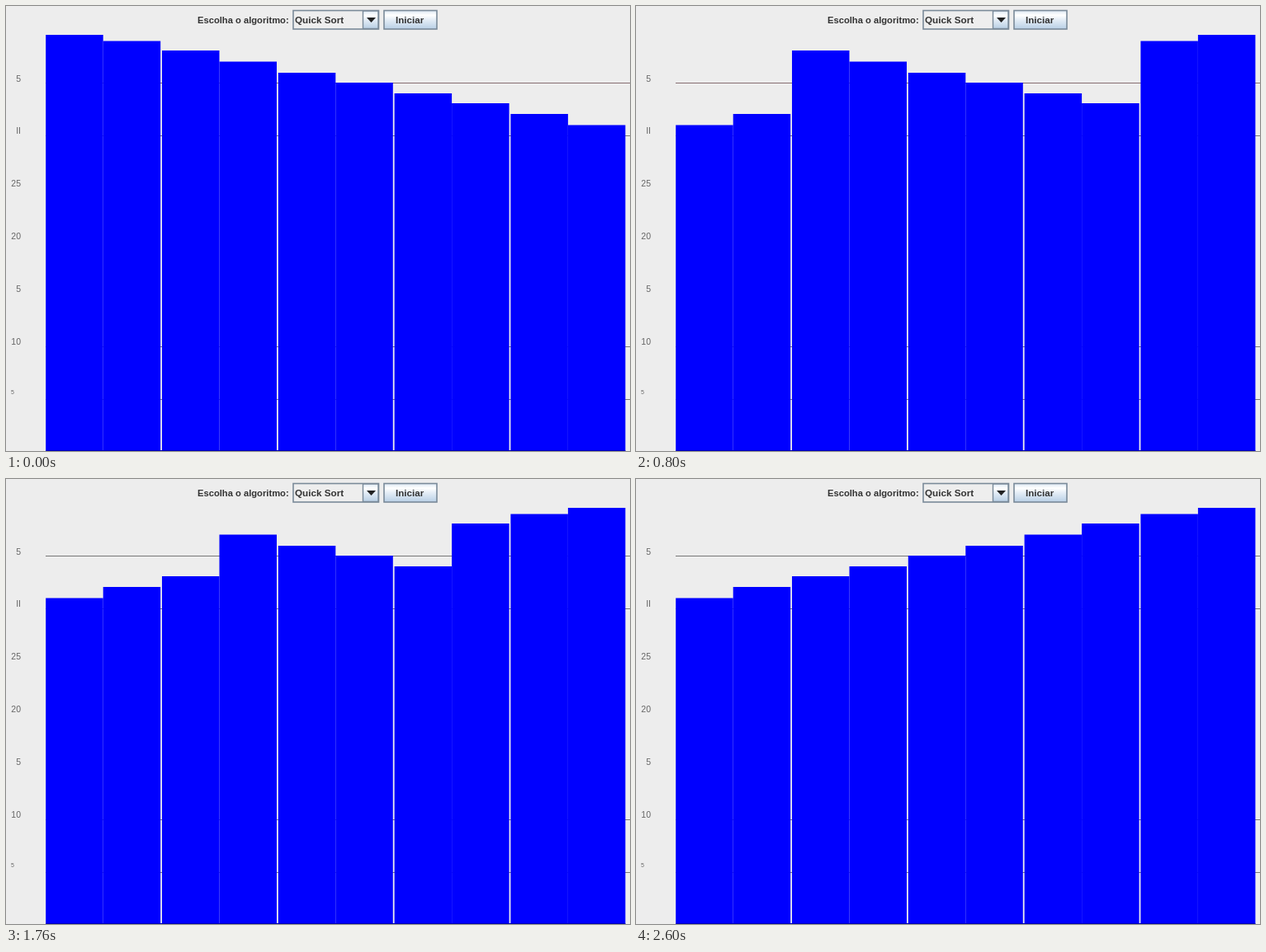
An HTML page for the animation above (3000 ms loop, 756 px wide and 540 px high).

```html
<!DOCTYPE html>
<html lang="pt">
<head>
<meta charset="utf-8">
<title>Quick Sort</title>
<style>
  html, body { margin: 0; width: 100%; height: 100%; overflow: hidden; background: #ededed; }
  svg { display: block; width: 100%; height: 100%; }
  text { font-family: "Liberation Sans", Arial, sans-serif; fill: #333; }
  .ui { font-weight: bold; }
  .axis { font-size: 10.5px; fill: #666; text-anchor: end; }
</style>
</head>
<body>
<svg viewBox="0 0 756 540">
  <defs>
    <linearGradient id="metal" x1="0" y1="0" x2="0" y2="1">
      <stop offset="0" stop-color="#dde8f3"/>
      <stop offset=".25" stop-color="#fff"/>
      <stop offset=".5" stop-color="#e4edf6"/>
      <stop offset="1" stop-color="#b8cfe5"/>
    </linearGradient>
  </defs>
  <rect width="756" height="540" fill="#ededed"/>
  <g id="grid" shape-rendering="crispEdges"></g>
  <g id="bars" fill="#00f"></g>
  <g id="axis"></g>

  <text class="ui" x="232" y="21" font-size="11.2">Escolha o algoritmo:</text>

  <rect x="348" y="5.5" width="103.5" height="22.5" fill="#eee" stroke="#7a8a99" stroke-width="1.6"/>
  <rect x="432.5" y="6" width="18.5" height="21.5" fill="url(#metal)" stroke="#7a8a99" stroke-width="1.4"/>
  <path d="M437 14h11l-5.5 6z" fill="#222"/>
  <text class="ui" x="350" y="20.5" font-size="11.7">Quick Sort</text>

  <rect x="458" y="5.5" width="64" height="22.5" fill="url(#metal)" stroke="#7a8a99" stroke-width="1.6"/>
  <text class="ui" x="472" y="21" font-size="11.6">Iniciar</text>
</svg>
<script>
  const NS = "http://www.w3.org/2000/svg";
  const LOOP = 3000;
  const TOPS = [35, 42.5, 54, 67.5, 81, 93, 106, 118, 131, 144.5];
  const SWAPS = [200, 800, 1400, 2000, 2600];
  const LABELS = [["5", 92], ["II", 155], ["25", 219], ["20", 283], ["5", 347], ["10", 411]];

  function add(parent, tag, attrs, text) {
    const el = document.createElementNS(NS, tag);
    for (const key in attrs) el.setAttribute(key, attrs[key]);
    if (text) el.textContent = text;
    document.getElementById(parent).appendChild(el);
    return el;
  }

  const lines = [93, 157, 413, 477].map(y =>
    add("grid", "rect", { x: 48, y, width: 708, height: 1, fill: "#777" }));

  LABELS.forEach(([label, y]) => add("axis", "text", { class: "axis", x: 18, y }, label));
  add("axis", "text", { class: "axis", x: 10, y: 471, style: "font-size:7px" }, "5");

  // Bars touch in pairs, with a thin gap between the pairs.
  const bars = TOPS.map((_, i) => add("bars", "rect", {
    x: 48.2 + Math.floor(i / 2) * 140.8 + (i % 2) * 69.5,
    width: 69.5
  }));
  add("bars", "rect", { x: 48.2, y: 539, width: 702.2, height: 1, fill: "#0000b4" });

  function render(t) {
    bars.forEach((bar, i) => {
      const swapped = t >= SWAPS[Math.min(i, 9 - i)];
      const top = TOPS[swapped ? 9 - i : i];
      bar.setAttribute("y", top);
      bar.setAttribute("height", 540 - top);
    });
    const warm = t < 200 || (t >= 800 && t < 1000);
    lines[0].setAttribute("fill", warm ? "#866e72" : "#777");
  }

  const start = performance.now();
  function tick() {
    render((performance.now() - start) % LOOP);
    requestAnimationFrame(tick);
  }
  tick();
</script>
</body>
</html>
```
